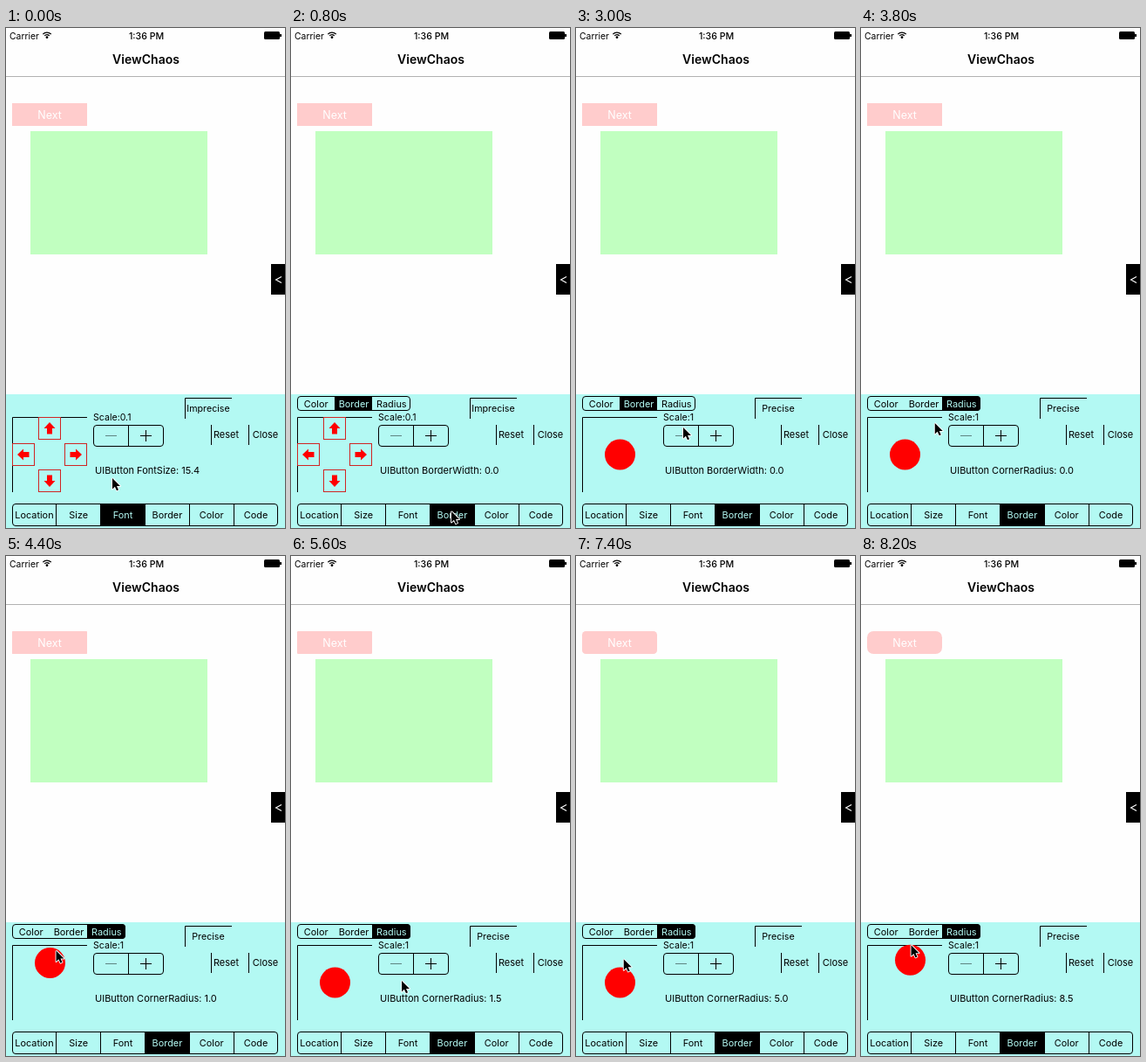
Animation of 320x572 px, one loop 8.4 s. Source, as an HTML page with a canvas:

```html
<!DOCTYPE html>
<html lang="en">
<head>
<meta charset="utf-8">
<title>ViewChaos</title>
<style>
html, body { margin: 0; width: 100%; height: 100%; overflow: hidden; background: #fefefe; }
canvas { display: block; }
</style>
</head>
<body>
<canvas id="stage" width="320" height="572"></canvas>
<script>
const ctx = document.getElementById('stage').getContext('2d', { alpha: false });
const LOOP = 8400, STEP = 200;
const CYAN = '#b3f9f3', BLACK = '#000', RED = '#f00';
const FAMILY = 'Inter, Roboto, sans-serif';

// Clicks that change the panel
const BORDER_TAB = 800, PRECISE = 2400, RADIUS_TAB = 3600;

// Each drag pulls the ball up and springs it home on release.
const HOME = { x: 50.5, y: 488 }, DRAG_TIME = 800, REACH = 30;
const drags = [
  { start: 4000, dx: 0, gain: 1.5, grab: { x: 7, y: -14 } },
  { start: 6400, dx: 2, gain: 3.5, grab: { x: 4, y: -2 } },
  { start: 7700, dx: 7, gain: 4, grab: { x: 1, y: -17 } }
];

const clamp = v => Math.min(1, Math.max(0, v));
const easeOut = k => 1 - (1 - k) ** 2;
const smooth = k => k * k * (3 - 2 * k);
const mix = (a, b, k) => a + (b - a) * k;
const pull = (drag, t) => easeOut(clamp((t - drag.start) / DRAG_TIME));
const held = t => drags.find(d => t >= d.start && t < d.start + DRAG_TIME);

function ballAt(t, drag = held(t)) {
  if (!drag) return HOME;
  const k = pull(drag, t);
  return { x: HOME.x + drag.dx * k, y: HOME.y - REACH * k };
}

function handAt(t, drag) {
  const ball = ballAt(t, drag);
  return { t, x: ball.x + drag.grab.x, y: ball.y + drag.grab.y };
}

function radiusAt(t) {
  const total = drags.reduce((sum, d) => sum + d.gain * pull(d, t), 0);
  return Math.round(total * 2) / 2;
}

// Places the pointer visits, with the ends of every drag
const stops = [
  { t: 0, x: 122, y: 515 },
  { t: BORDER_TAB, x: 184, y: 553 },
  { t: 2000, x: 206, y: 441 },
  { t: PRECISE, x: 220, y: 437 },
  { t: 3000, x: 123, y: 457 },
  { t: RADIUS_TAB, x: 112, y: 430 },
  { t: 5600, x: 127, y: 486 },
  ...drags.flatMap(d => [d.start, d.start + DRAG_TIME].map(t => handAt(t, d)))
].sort((a, b) => a.t - b.t);

function pointerAt(t) {
  const drag = held(t);
  if (drag) return handAt(t, drag);
  const next = stops.findIndex(s => s.t > t);
  const a = stops[next - 1], b = stops[next];
  const k = smooth((t - a.t) / (b.t - a.t));
  return { x: mix(a.x, b.x, k), y: mix(a.y, b.y, k) };
}

function rect(x, y, w, h, color) {
  ctx.fillStyle = color;
  ctx.fillRect(x, y, w, h);
}

function text(str, x, y, size = 10.9, color = BLACK, align = 'center', weight = 400) {
  ctx.font = `${weight} ${size}px ${FAMILY}`;
  ctx.textAlign = align;
  ctx.fillStyle = color;
  ctx.fillText(str, x, y);
}

function line(points, color = BLACK, width = 1) {
  ctx.beginPath();
  points.forEach(([x, y]) => ctx.lineTo(x, y));
  ctx.strokeStyle = color;
  ctx.lineWidth = width;
  ctx.stroke();
}

function polygon(points, color) {
  ctx.beginPath();
  points.forEach(([x, y]) => ctx.lineTo(x, y));
  ctx.closePath();
  ctx.fillStyle = color;
  ctx.fill();
}

function disc(x, y, r, color) {
  ctx.beginPath();
  ctx.arc(x, y, r, 0, Math.PI * 2);
  ctx.fillStyle = color;
  ctx.fill();
}

function roundBox(x, y, w, h, r, color) {
  ctx.beginPath();
  ctx.roundRect(x, y, w, h, r);
  ctx.fillStyle = color;
  if (color) ctx.fill();
}

function outline(x, y, w, h) {
  roundBox(x + 0.5, y + 0.5, w - 1, h - 1, 3.5);
  ctx.strokeStyle = BLACK;
  ctx.lineWidth = 1;
  ctx.stroke();
}

function segments(labels, selected, x, y, w, h, dividers) {
  const cell = w / labels.length;
  const edge = i => Math.floor(x + i * cell);
  ctx.save();
  roundBox(x, y, w, h, 4);
  ctx.clip();
  labels.forEach((label, i) => {
    if (i === selected) rect(edge(i), y, edge(i + 1) - edge(i), h, BLACK);
    else if (dividers && i) rect(edge(i), y, 1, h, BLACK);
  });
  ctx.restore();
  outline(x, y, w, h);
  labels.forEach((label, i) =>
    text(label, x + (i + 0.5) * cell, y + h / 2 + 4, 10.9, i === selected ? CYAN : BLACK));
}

function statusBar() {
  text('Carrier', 4, 12.5, 10.4, BLACK, 'left');
  text('1:36 PM', 161, 12.5, 10.6, BLACK, 'center', 500);
  ctx.strokeStyle = BLACK;
  ctx.lineWidth = 1.3;
  for (const r of [3.8, 6.4]) {
    ctx.beginPath();
    ctx.arc(47, 11.5, r, -Math.PI * 0.76, -Math.PI * 0.24);
    ctx.stroke();
  }
  disc(47, 10.7, 1.4, BLACK);
  roundBox(296, 4, 18, 9, 1.5, BLACK);
  rect(314, 7, 2, 3, BLACK);
}

function page(radius) {
  rect(0, 0, 320, 572, '#fefefe');
  statusBar();
  text('ViewChaos', 160.5, 41, 14, BLACK, 'center', 600);
  rect(0, 55, 320, 1, '#b2b2b2');
  roundBox(7, 86, 86, 26, radius * 0.853, '#ffcccc');
  text('Next', 50, 103.5, 12.5, '#fff');
  rect(28, 118, 203, 141, '#c1ffc0');
  rect(304, 270, 16, 35, BLACK);
  line([[316, 284.5], [309.5, 288], [316, 291.5]], '#fff', 1.1);
}

function arrowKey(angle) {
  const half = [[0, -7], [6.5, 0], [3, 0], [3, 6.5]];
  ctx.save();
  ctx.translate(50 + Math.round(30 * Math.sin(angle)), 488 - Math.round(30 * Math.cos(angle)));
  ctx.strokeStyle = '#d02523';
  ctx.lineWidth = 1;
  ctx.strokeRect(-12.5, -12.5, 25, 25);
  ctx.rotate(angle);
  polygon([...half, ...half.map(([x, y]) => [-x, y]).reverse()], RED);
  ctx.restore();
}

function pad(precise, ball) {
  line([[93, 445.5], [7.5, 445.5], [7.5, 531]]);
  if (precise) disc(ball.x, ball.y, 17.5, RED);
  else for (let i = 0; i < 4; i++) arrowKey(i * Math.PI / 2);
}

function stepper() {
  outline(100, 454, 81, 25);
  rect(140, 454, 1, 25, BLACK);
  rect(114, 466, 13, 1, '#5f8582');
  rect(154, 466, 13, 1, BLACK);
  rect(160, 460, 1, 13, BLACK);
}

function pointer({ x, y }) {
  const shape = [[0, 0], [0, 12.5], [2.9, 9.8], [5, 14.2], [7, 13.3], [5, 9], [9, 9]]
    .map(([dx, dy]) => [x + dx, y + dy]);
  ctx.lineJoin = 'round';
  line([...shape, shape[0]], '#fff', 1.8);
  polygon(shape, BLACK);
  ctx.lineJoin = 'miter';
}

function draw(t) {
  const border = t >= BORDER_TAB, precise = t >= PRECISE, corner = t >= RADIUS_TAB;
  const radius = radiusAt(t);
  page(radius);

  rect(0, 419, 320, 153, CYAN);
  text(precise ? 'Scale:1' : 'Scale:0.1', 100, 449, 10.6, BLACK, 'left');
  if (border) {
    rect(100, 438, 46, 3, CYAN);
    segments(['Color', 'Border', 'Radius'], corner ? 2 : 1, 7, 421, 130, 17, false);
  }
  pad(precise, ballAt(t));
  stepper();

  line([[259, 423.5], [205.5, 423.5], [205.5, 447]]);
  text(precise ? 'Precise' : 'Imprecise', 232, 439, 10.7);
  rect(235, 454, 1, 23, BLACK);
  rect(278, 454, 1, 23, BLACK);
  text('Reset', 252.5, 469, 11);
  text('Close', 297.5, 469, 11);

  const info = corner ? 'CornerRadius: ' + radius.toFixed(1)
    : border ? 'BorderWidth: 0.0' : 'FontSize: 15.4';
  text('UIButton ' + info, 102, 509.5, 11, BLACK, 'left');
  segments(['Location', 'Size', 'Font', 'Border', 'Color', 'Code'],
    border ? 3 : 2, 7, 544, 305, 26, true);

  pointer(pointerAt(t));
}

const start = performance.now();
function tick() {
  const t = (performance.now() - start) % LOOP;
  draw(Math.floor(t / STEP) * STEP);
  requestAnimationFrame(tick);
}
tick();
</script>
</body>
</html>
```
